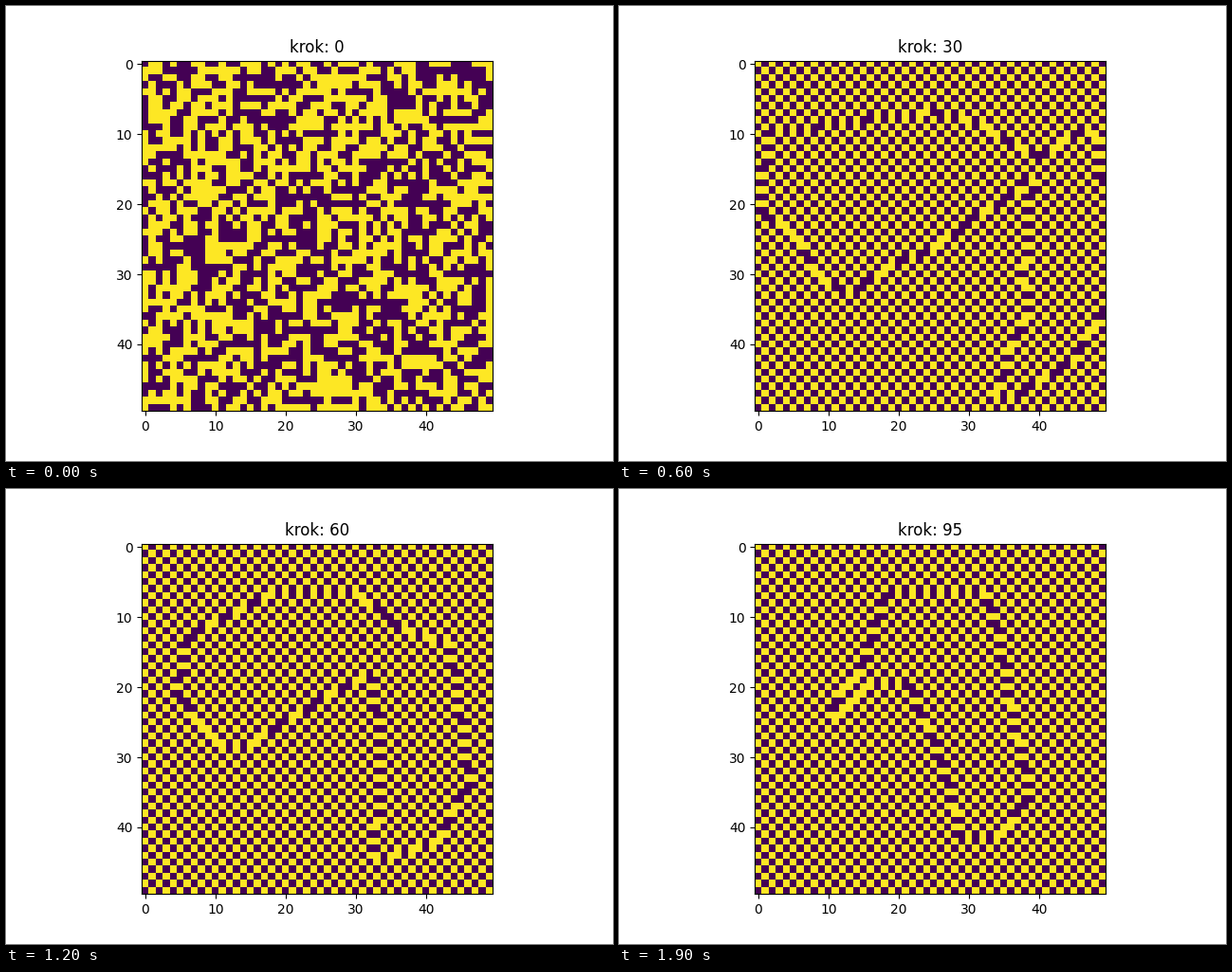
A matplotlib script for the animation above (2 s loop, 640 by 480 pixels).

```python
import numpy as np
import matplotlib.pyplot as plt
from matplotlib.animation import FuncAnimation
from matplotlib.path import Path

N = 50
FRAMES = 20
STEPS_PER_FRAME = 5
SETTLED = 8           # frame at which the random domains have died out
WIDE_AT, SLIM_AT = 12, 19

# The surviving domain shrinks steadily from WIDE to SLIM (cell units).
WIDE = np.array([(18, 7.4), (30, 6.8), (38.5, 13), (44, 14), (46.8, 34),
                 (42, 42.5), (33, 45.5), (34.3, 32), (33, 18.6), (26, 22),
                 (14, 29.6), (10.8, 28.5), (5, 21.6), (6.6, 13)])
SLIM = np.array([(19, 7), (33, 7), (35, 14), (36.2, 22), (39.3, 36),
                 (35, 41.6), (29.6, 42.2), (26.6, 31), (22, 20), (17, 20),
                 (13, 24), (11.2, 25), (11, 23.2), (15, 18.5)])

rng = np.random.default_rng(7)
noise = rng.normal(size=(N, N))
rows, cols = np.mgrid[:N, :N]
centres = np.column_stack([cols.ravel(), rows.ravel()]) + 0.5


def signed_distance(outline):
    """Distance from each cell centre to the outline, positive inside."""
    edge = np.roll(outline, -1, axis=0) - outline
    rel = centres[:, None] - outline
    t = np.clip((rel * edge).sum(2) / (edge ** 2).sum(1), 0, 1)
    dist = np.linalg.norm(rel - t[..., None] * edge, axis=2).min(1)
    inside = Path(np.vstack([outline, outline[:1]])).contains_points(centres)
    return np.where(inside, dist, -dist).reshape(N, N)


def smooth(field, passes):
    for _ in range(passes):
        field = (field + sum(np.roll(field, shift, axis)
                             for shift in (-1, 1) for axis in (0, 1))) / 5
    return field / field.std()


def domain(k):
    """Positive where the checkerboard is flipped."""
    t = (max(k, SETTLED) - WIDE_AT) / (SLIM_AT - WIDE_AT)
    shape = np.clip(signed_distance(WIDE + t * (SLIM - WIDE)), -3, 3)
    order = min(1, k / SETTLED)
    return order * shape + 2 * (1 - order) * smooth(noise, 2 * k)


def spins(k):
    return (rows + cols + (domain(k) <= 0)) % 2


fig, ax = plt.subplots(figsize=(6.4, 4.8), dpi=100)
image = ax.imshow(spins(0), cmap="viridis", vmin=0, vmax=1,
                  interpolation="nearest")
title = ax.set_title("krok: 0")


def update(k):
    image.set_data(spins(k))
    title.set_text(f"krok: {k * STEPS_PER_FRAME}")
    return image, title


anim = FuncAnimation(fig, update, frames=FRAMES, interval=100,
                     init_func=lambda: update(0), repeat=True, repeat_delay=0)
plt.show()
```
